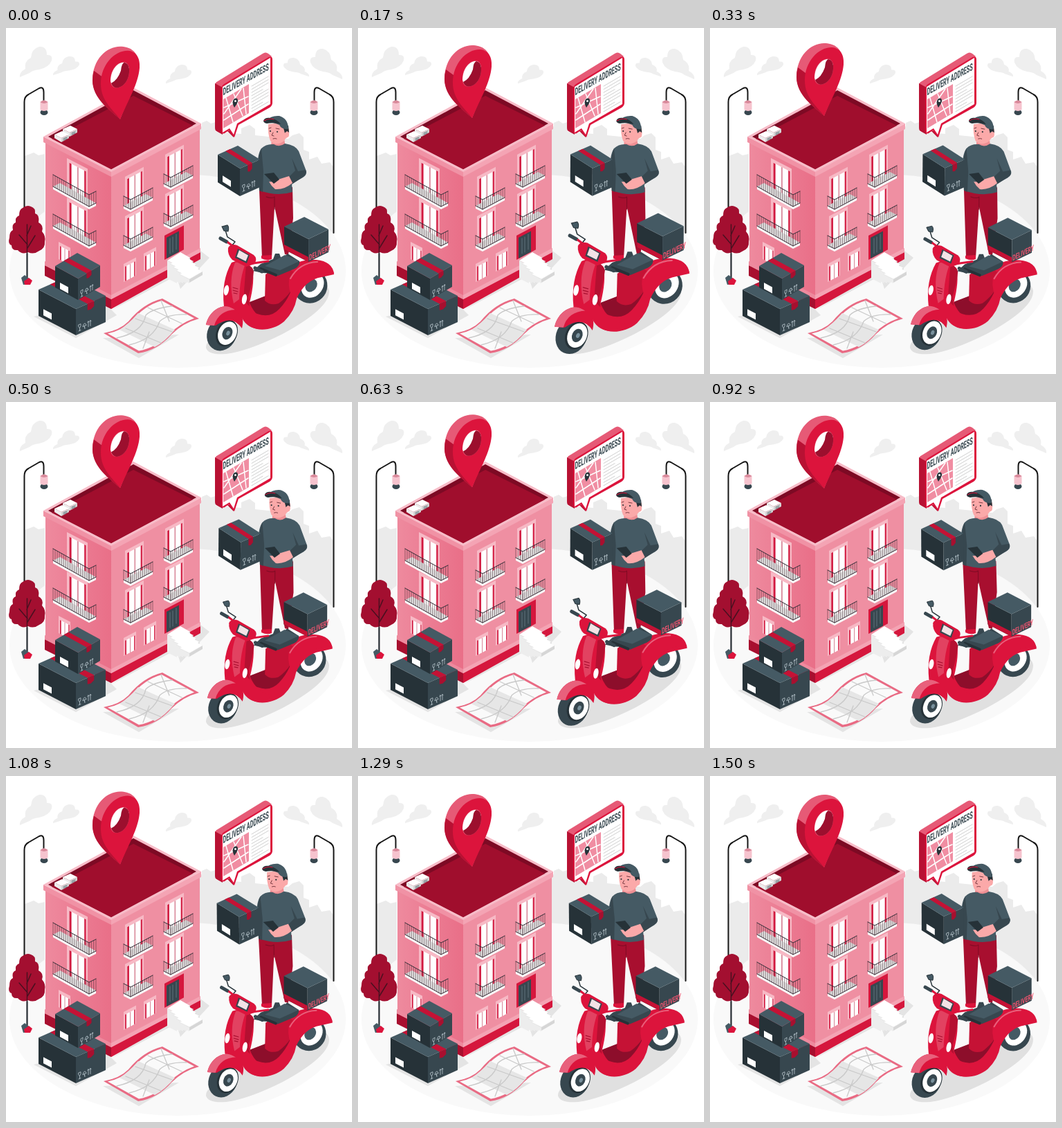
Animation, 500 px wide and 500 px high, one loop 1540 ms. Source, as an HTML page:

```html
<!DOCTYPE html>
<html lang="en">
<head>
<meta charset="utf-8">
<title>Delivery address</title>
<style>
html, body { margin: 0; width: 100%; height: 100%; overflow: hidden; background: #fff; }
svg { display: block; width: 100vw; height: 100vh; }
text { font-family: Roboto, "Open Sans", sans-serif; font-weight: 600; }
.line { fill: none; stroke-linecap: round; stroke-linejoin: round; }
</style>
</head>
<body>
<svg viewBox="0 0 500 500">
<defs>
  <linearGradient id="wall"><stop stop-color="#ee8a9e"/><stop offset="1" stop-color="#e96f88"/></linearGradient>
  <path id="cloud" d="M0 44Q-1 37 8 32Q6 21 16 16Q17 3 28 0Q39-1 39 12Q48 11 46 20Q42 30 28 33Q18 34 14 38Z" fill="#efefef"/>
  <g id="lamp">
    <path class="line" d="M26.500 296V107Q26.500 99 32.500 96L48 87Q54.500 84 54.500 93V106" stroke="#161616" stroke-width="2"/>
    <ellipse cx="55" cy="122" rx="5.500" ry="4" fill="#37474f"/>
    <path d="M49.500 107Q55 102 60.500 107V118Q55 122 49.500 118Z" fill="#f6c3ce"/>
    <path d="M49.500 107Q55 102 60.500 107Q55 111 49.500 107Z" fill="#d98a9b"/>
  </g>
</defs>

<path d="M27 290V185L40 180L47 184L56 182V290Z M270 230V150L283 142V137L290 134L296 138L303 136V150L340 153V145L352 140L360 146V155L408 160L414 155L424 152L430 158V176L438 179V190L450 186L456 196L468 194L474 202V310H270Z" fill="#ebebeb"/>
<ellipse cx="248" cy="351" rx="243" ry="140" fill="#f9f9f9"/>
<use href="#cloud" transform="translate(20 27)"/>
<use href="#cloud" transform="translate(68 41) scale(.82 .62)"/>
<use href="#cloud" transform="translate(231 53) scale(.8 .62)"/>
<use href="#cloud" transform="translate(438 43) scale(-.8 .62)"/>
<use href="#cloud" transform="translate(486 30) scale(-1 1)"/>
<use href="#lamp"/>
<use href="#lamp" transform="matrix(-1 0 0 1 500 0)"/>
<path d="M152 408L246 358L252 377L294 332L281 322Z M40 417L101 448L160 415L140 395Z M140 448L192 477L250 443Z" fill="#e4e4e4"/>
<path d="M289 462Q292 473 318 471Q350 467 400 442Q468 405 467 380Q464 362 430 372L310 440Q288 452 289 462Z" fill="#e0e0e0"/>

<g id="building"></g>

<g id="pin">
  <path fill-rule="evenodd" fill="#e65a76" d="M165 132C153 121 125 101 125 76C125 46 145 27 165 27C178 27 190 33 192 50L182 90Z M151 77C154 91 176 78 178 59C176 42 152 50 151 77Z"/>
  <path fill="#b81133" d="M165 132C150 119 125 102 125 76Q125 68 127 62L138 70L151 110Z"/>
  <path fill-rule="evenodd" fill="#dc143c" d="M165 132C154 118 137 105 137 81C137 54 156 33 176 33C190 34 194 46 193 58C191 81 177 104 165 132Z M151 74C150 86 158 89 166 85C174 81 179 70 178 59C177 49 170 47 162 52C155 57 151 66 151 74Z"/>
  <path d="M166 85C174 81 179 70 178 59Q177 51 171 50Q167 51 166 62Q161 76 152 80Q156 90 166 85Z" fill="#9c0f2e"/>
</g>

<path d="M24 260Q30 255 36 258Q43 260 42 268Q49 270 47 281Q55 285 52 294Q58 301 56 309Q57 318 48 322Q40 328 32 324Q23 328 17 321Q8 322 8 314Q2 312 5 303Q5 294 10 292Q8 283 14 281Q13 273 19 271Q19 262 24 260Z" fill="#a30f30"/>
<path class="line" d="M30.500 364V284M31 313L19 299M31 318L42 300M30 300L36 286" stroke="#4a1020" stroke-width="1.500"/>
<path class="line" d="M30.500 364V326" stroke="#263238" stroke-width="2"/>
<path d="M22 361L27 357L33 362L32 370L25 371Z" fill="#455a64"/>
<path d="M26 366L33 361L38 365L35 371L27 371Z" fill="#dc143c"/>

<g id="stack"></g>

<g id="map">
  <path d="M141 441Q164 437 177 424Q198 398 226 391L279 420Q256 426 239 443Q219 466 191 470Z" fill="#e96b84"/>
  <path d="M147 441.500Q168 437 181 424Q200 401 225 394L272 419.500Q251 427 235 443Q217 462 192 466.500Z" fill="#fafafa"/>
  <path d="M164 436Q177 428 191 412L244 436Q229 454 215 461Z" fill="#e6e6e6"/>
  <path class="line" d="M160 448Q197 440 202 415Q212 405 240 402M178 458Q213 450 222 424Q234 413 261 414M173 434L224 455M187 420L240 439M205 404L254 427M207 439L198 463M224 394L236 424" stroke="#c9c9c9" stroke-width="1.300"/>
</g>

<g id="bubble">
  <path d="M302 82Q302 79 306 77L371 37Q375 34 379 37L384 41L312 87Z" fill="#e65a76"/>
  <path d="M302 80L313 86V154L304 149Q302 148 302 144Z M319 148L329 158L331 150Z" fill="#b81133"/>
  <path d="M311 88Q311 84 315 81L378 43Q385 39 385 46V108Q385 112 381 115L336 140L330 158L322 148L316 152Q311 154 311 148Z" fill="#dc143c"/>
  <path d="M313 85L382 43V110L334 138L329 154L323 145L313 151Z" fill="#fff"/>
  <path d="M314 103L351 81V123L314 145Z" fill="#f08da2"/>
  <path class="line" d="M315 115L350 99M315 133L350 110M318 101L328 136M329 95L342 127M343 87L347 124M315 124L340 88" stroke="#fff" stroke-width="1.500"/>
  <path d="M330 115Q326 108 329 103Q335 99 335 106Q334 110 330 115Z" fill="#263238"/>
  <circle cx="331.500" cy="105.500" r="1.500" fill="#fff"/>
  <path id="notes" class="line" stroke="#d0d0d0" stroke-width="1"/>
  <text transform="matrix(.5 -.28 0 1 313.500 97.500)" font-size="14.500" fill="#37474f">DELIVERY ADDRESS</text>
</g>

<g id="man">
  <path d="M366 234L414 230L415 275L408 328L403 327L388 258L384 332L370 332Z" fill="#a80f2f"/>
  <path d="M376 244Q385 247 388 244V262" class="line" stroke="#7f0b24"/>
  <path d="M369 329L384 328L384 334Q377 337 369 333Z" fill="#dc143c"/>
  <path d="M384 160L402 160L404 172L392 177L383 171Z" fill="#ee8f94"/>
  <path d="M379 139L404 136Q412 148 408 157Q404 159 402 163Q390 172 382 163Q378 153 379 139Z" fill="#fba9a9"/>
  <path d="M400 141L408 141L409 151L406 149L403 152Z" fill="#263238"/>
  <ellipse cx="406" cy="154" rx="3" ry="4" fill="#fba9a9"/>
  <g fill="#263238"><circle cx="382" cy="149" r="1.100"/><circle cx="392" cy="150" r="1.100"/></g>
  <path class="line" d="M380 145L383 144M390 145L395 146M386 151L384 155L387 156M386 160Q389 159 391 160" stroke="#6a2e36" stroke-width=".9"/>
  <path d="M376 134Q383 126 395 127Q408 131 408 146Q398 147 395 140L384 136Z" fill="#455a64"/>
  <path d="M372 134Q374 129 382 130Q392 132 397 139Q386 136 377 138Q372 137 372 134Z" fill="#263238"/>
  <path d="M373 134Q379 130 387 132" class="line" stroke="#dc143c" stroke-width="1"/>
  <path d="M369 174Q376 167 387 168Q395 173 403 167Q418 169 423 178L434 207Q435 212 429 216L413 225L414 237Q392 244 367 235L364 210Q362 184 369 174Z" fill="#455a64"/>
  <path d="M369 174Q361 190 366 235L371 237L372 207Z M413 188L418 206L409 215L413 226L431 214Q435 211 433 205L422 207Z" fill="#37474f"/>
  <path d="M380 222Q388 223 393 219L409 214L414 224Q402 234 389 233Q383 228 380 222Z" fill="#fba9a9"/>
  <path d="M373 211L387 209L395 219L387 225Z" fill="#263238"/>
  <g id="parcel"></g>
</g>

<g id="scooter">
  <ellipse cx="440" cy="373" rx="24" ry="25" transform="rotate(35 440 373)" fill="#37474f"/>
  <ellipse cx="443" cy="372" rx="15" ry="19" transform="rotate(35 443 372)" fill="#fff"/>
  <ellipse cx="441" cy="372" rx="8" ry="10" transform="rotate(35 441 372)" fill="#455a64"/>
  <path d="M345 421C350 439 382 441 402 424Q417 409 420 391Q432 364 456 360L474 356Q472 337 448 335Q424 333 402 350L377 354L378 386L352 397Z" fill="#dc143c"/>
  <path d="M352 396L378 386L386 376L400 366L418 356Q414 386 395 406Q378 424 351 407Z" fill="#8d0e2b"/>
  <path d="M375 356Q404 339 421 357Q416 382 394 398Q382 402 374 394Z" fill="#c51235"/>
  <path d="M409 362Q422 337 452 338Q467 340 474 354Q446 350 426 375L416 393Q407 380 409 362Z" fill="#dc143c"/>
  <path class="line" d="M411 362Q424 339 450 338" stroke="#e8617c" stroke-width="2"/>
  <ellipse cx="312" cy="442" rx="21" ry="25" transform="rotate(25 312 442)" fill="#37474f"/>
  <ellipse cx="319" cy="441" rx="15" ry="20" transform="rotate(25 319 441)" fill="#263238"/>
  <ellipse cx="320" cy="441" rx="13" ry="17.500" transform="rotate(25 320 441)" fill="#fff"/>
  <ellipse cx="320" cy="441" rx="7" ry="9.500" transform="rotate(25 320 441)" fill="#37474f"/>
  <ellipse cx="321" cy="441" rx="2.500" ry="3.500" transform="rotate(25 321 441)" fill="#78909c"/>
  <path d="M289 429C293 411 307 401 321 402C337 404 346 416 341 434Q327 413 303 430Z" fill="#dc143c"/>
  <path d="M289 429C293 411 307 401 321 402L332 407Q307 408 301 430Z" fill="#e8617c"/>
  <path d="M326 339Q342 332 356 347Q360 365 352 397Q362 422 386 425L369 435Q349 435 341 419Q331 402 315 402Q311 365 326 339Z" fill="#dc143c"/>
  <path d="M347 341Q357 345 358 352Q356 369 350 389L352 402Q343 396 344 381Z" fill="#b51031"/>
  <path d="M331 339Q338 337 346 341Q338 360 337 392L329 398Q321 365 331 339Z" fill="#e24261"/>
  <path class="line" d="M328 375L335 377M328 379L335 381M329 383L334 384" stroke="#a80f2f" stroke-width="1.200"/>
  <ellipse cx="318.500" cy="379" rx="3.500" ry="7.500" transform="rotate(10 318.500 379)" fill="#fff"/>
  <ellipse cx="344.500" cy="392" rx="3.500" ry="7.500" transform="rotate(10 344.500 392)" fill="#fff"/>
  <path d="M357 351L368 341L386 334L389 326L395 326L398 334L407 326L424 337Q425 344 417 348L393 358Q384 354 371 354Z" fill="#37474f"/>
  <path d="M374 344L403 328L424 337L396 350Z" fill="#455a64"/>
  <path class="line" d="M368 348L390 357" stroke="#263238" stroke-width="4"/>
  <path d="M321 318Q324 311 334 314L358 328Q364 333 359 341L347 345L327 335Q320 328 321 318Z" fill="#dc143c"/>
  <path d="M335 319L352 328L348 340L331 332Z" fill="#37474f"/>
  <path d="M337 321L350 328.500L346.500 337L333.500 330.500Z" fill="#f3e3e6"/>
  <path class="line" d="M317 292L320 302L331 309L326 315" stroke="#263238" stroke-width="1.500"/>
  <path d="M312 287L320 285Q323 288 321 294L315 293Z" fill="#455a64" stroke="#263238"/>
  <path class="line" d="M310 304L319 309M360 347L370 352" stroke="#37474f" stroke-width="5"/>
  <path class="line" d="M321 310L329 316M357 340L379 337" stroke="#dc143c" stroke-width="3"/>
  <g id="trunk"></g>
  <text transform="matrix(.6 -.3 0 1 438 336)" font-size="11.500" fill="#f0546f">DELIVERY</text>
</g>
</svg>

<script>
const $ = id => document.getElementById(id);
const poly = (points, fill) => `<polygon points="${points.join(' ')}" fill="${fill}"/>`;
const line = (d, color, width = 1) => `<path class="line" d="${d}" stroke="${color}" stroke-width="${width}"/>`;
const mix = (p, q, k) => [p[0] + (q[0] - p[0]) * k, p[1] + (q[1] - p[1]) * k];
const down = (p, h) => [p[0], p[1] + h];

// Isometric box from the left, front and right corners of its lid.
function crate(left, front, right, h, packed = true) {
  const back = [left[0] + right[0] - front[0], left[1] + right[1] - front[1]];
  let out = poly([left, front, down(front, h), down(left, h)], '#263238')
    + poly([front, right, down(right, h), down(front, h)], '#37474f')
    + poly([left, front, right, back], '#455a64');
  if (!packed) return out;
  const a = mix(front, right, .39), b = mix(front, right, .61);
  out += poly([a, b, mix(left, back, .61), mix(left, back, .39)], '#c51235')
    + poly([a, b, down(b, h * .2), down(mix(a, b, .5), h * .27), down(a, h * .24)], '#a80f2f');
  const width = front[0] - left[0], c = mix(left, front, 7 / width), d = mix(left, front, 19 / width);
  out += poly([down(c, h * .65), down(d, h * .65), down(d, h * .65 + 9), down(c, h * .65 + 9)], '#fff');
  const slope = (right[1] - front[1]) / (right[0] - front[0]);
  return out + `<g transform="matrix(1 ${slope} 0 1 ${front[0]} ${front[1] + h * .65})">`
    + line('M4 0h3v3l-1.500 2l-1.500-2zM5.500 5v4M4 9h3M10 5Q12.500-2 15 5zM12.500 5v4h1M18 9v-8M21 9v-8M17 2.500l1-1.500l1 1.500M20 2.500l1-1.500l1 1.500', '#b0bec5', .8) + '</g>';
}

// Wall opening: slope is the vertical change per unit of width.
const slant = (x, y, w, h, slope, fill) =>
  poly([[x, y], [x + w, y + w * slope], [x + w, y + w * slope + h], [x, y + h]], fill);
function opening(x, y, w, h, slope) {
  const part = (from, to, top, fill) =>
    slant(x + w * from, y + w * from * slope + top, w * (to - from), h - top, slope, fill);
  return part(0, 1, 0, '#f7b9c5') + part(.12, .92, 5, '#fff')
    + part(.12, .22, 5, '#d21a40') + part(.84, .92, 5, '#d21a40')
    + part(.5, .56, 5, '#d98a9b');
}

function balcony(points, h) {
  const floor = points.map(p => down(p, h));
  const end = [points[0][0] + points[2][0] - points[1][0], points[0][1] + points[2][1] - points[1][1] + h];
  let bars = '';
  for (let s = 0; s < 2; s++) {
    const n = Math.round(Math.abs(points[s + 1][0] - points[s][0]) / 3);
    for (let i = 0; i <= n; i++) bars += `M${mix(points[s], points[s + 1], i / n)}v${h}`;
  }
  return poly([...floor, end], '#e3e3e3')
    + poly([...floor, ...floor.map(p => down(p, 4)).reverse()], '#fafafa')
    + line(bars, '#4a3038', .55) + line('M' + points.join('L') + 'M' + floor.join('L'), '#37303a', 1);
}

function building() {
  let out = poly([[57, 160], [152, 210], [152, 406], [57, 356]], 'url(#wall)')
    + poly([[152, 210], [280, 141], [280, 334], [152, 406]], '#ef8fa2')
    + poly([[56, 343], [152, 392], [152, 406], [56, 358]], '#a80f2f')
    + poly([[152, 392], [281, 324], [281, 334], [152, 406]], '#d5173d')
    + poly([[56, 337], [152, 386], [152, 392], [56, 343]], '#ee8a9e')
    + poly([[152, 386], [281, 318], [281, 324], [152, 392]], '#f4a4b4')
    + poly([[54, 157], [152, 207], [152, 215], [54, 165]], '#f092a5')
    + poly([[152, 207], [282, 138], [282, 146], [152, 215]], '#f4a4b4')
    + poly([[54, 157], [152, 208], [282, 138], [184, 86]], '#f7bcc8')
    + poly([[61, 157], [152, 204], [275, 138], [184, 90]], '#7d0a24')
    + poly([[66, 160], [152, 204], [270, 141], [184, 98]], '#a00e2d');
  for (const [x, y] of [[82, 146], [70, 154]]) {
    out += poly([[x, y], [x + 10, y + 5], [x + 10, y + 11], [x, y + 5]], '#ececec')
      + poly([[x + 10, y + 5], [x + 21, y], [x + 21, y + 5], [x + 10, y + 11]], '#d4d4d4')
      + poly([[x, y], [x + 10, y + 5], [x + 21, y], [x + 11, y - 5]], '#fff')
      + line(`M${x + 13} ${y + 6}l5-2m-5 4l5-2`, '#455a64', .8);
  }
  for (const dy of [0, 57]) {
    out += opening(88, 188 + dy, 30, 47, .52)
      + balcony([[68, 212 + dy], [120, 241 + dy], [130, 236 + dy]], 17);
    for (const k of [0, 1]) {
      const x = 58 * k, y = dy - 32 * k;
      out += opening(172 + x, 215 + y, 27, 46, -.53)
        + balcony([[170 + x, 243 + y], [180 + x, 248 + y], [212 + x, 231 + y]], 14);
    }
  }
  out += opening(76, 309, 17, 25, .52) + opening(170, 341, 18, 26, -.53) + opening(199, 326, 18, 26, -.53)
    + slant(229, 300, 28, 35, -.53, '#d5173d') + slant(232, 303, 18, 30, -.53, '#37474f')
    + line('M237 304v22m4-24v22m5-26v22', '#6b7f89', .8);
  for (let i = 0; i < 5; i++) {
    const x = 233 + i * 4.5, y = 336 + i * 5, h = 26 - i * 5;
    out += poly([[x, y], [x + 14, y + 7], [x + 14, y + 7 + h], [x, y + h]], '#ededed')
      + poly([[x + 14, y + 7], [x + 33, y - 4], [x + 33, y + 1], [x + 14, y + 12]], '#d6d6d6')
      + poly([[x, y], [x + 14, y + 7], [x + 33, y - 4], [x + 19, y - 12]], '#fff')
      + line(`M${x} ${y}l14 7l19-11`, '#dedede', .6);
  }
  return out;
}

$('building').innerHTML = building();
$('stack').innerHTML = crate([47, 378], [101, 406], [144, 387], 38) + crate([71, 344], [104, 362], [136, 343], 31);
$('parcel').innerHTML = crate([306, 183], [338, 203], [367, 190], 40);
$('trunk').innerHTML = crate([402, 287], [437, 305], [466, 291], 33, false)
  + poly([[402, 313], [437, 331], [437, 338], [402, 320]], '#c51235');
$('notes').setAttribute('d', Array.from({ length: 9 }, (_, i) => `M355 ${84 + i * 4.6}l${i % 4 == 3 ? '16-9' : '24-14'}`).join(''));

const LOOP = 1540;
// Two beats, then a rest: peak time in ms, half width and height.
const REST = .978;
const beats = [[150, 235, .077], [-1390, 235, .077], [1690, 235, .077], [718, 180, .074]];
const beatScale = t => beats.reduce((sum, [peak, half, height]) => {
  const d = Math.min(1, Math.abs(t - peak) / half);
  return sum + height * (1 + Math.cos(Math.PI * d)) / 2;
}, REST);

function draw(now) {
  const t = now % LOOP, turn = 2 * Math.PI / LOOP;
  $('pin').setAttribute('transform', `translate(0 ${-4.5 * (1 - Math.cos(turn * (t + 75)))})`);
  $('man').setAttribute('transform', `rotate(${.58 * Math.sin(turn * t)} 380 332)`);
  $('scooter').setAttribute('transform', `translate(380 378) scale(${beatScale(t)}) translate(-380 -378)`);
}

const start = performance.now();
function tick() {
  draw(performance.now() - start);
  requestAnimationFrame(tick);
}
tick();
</script>
</body>
</html>
```
